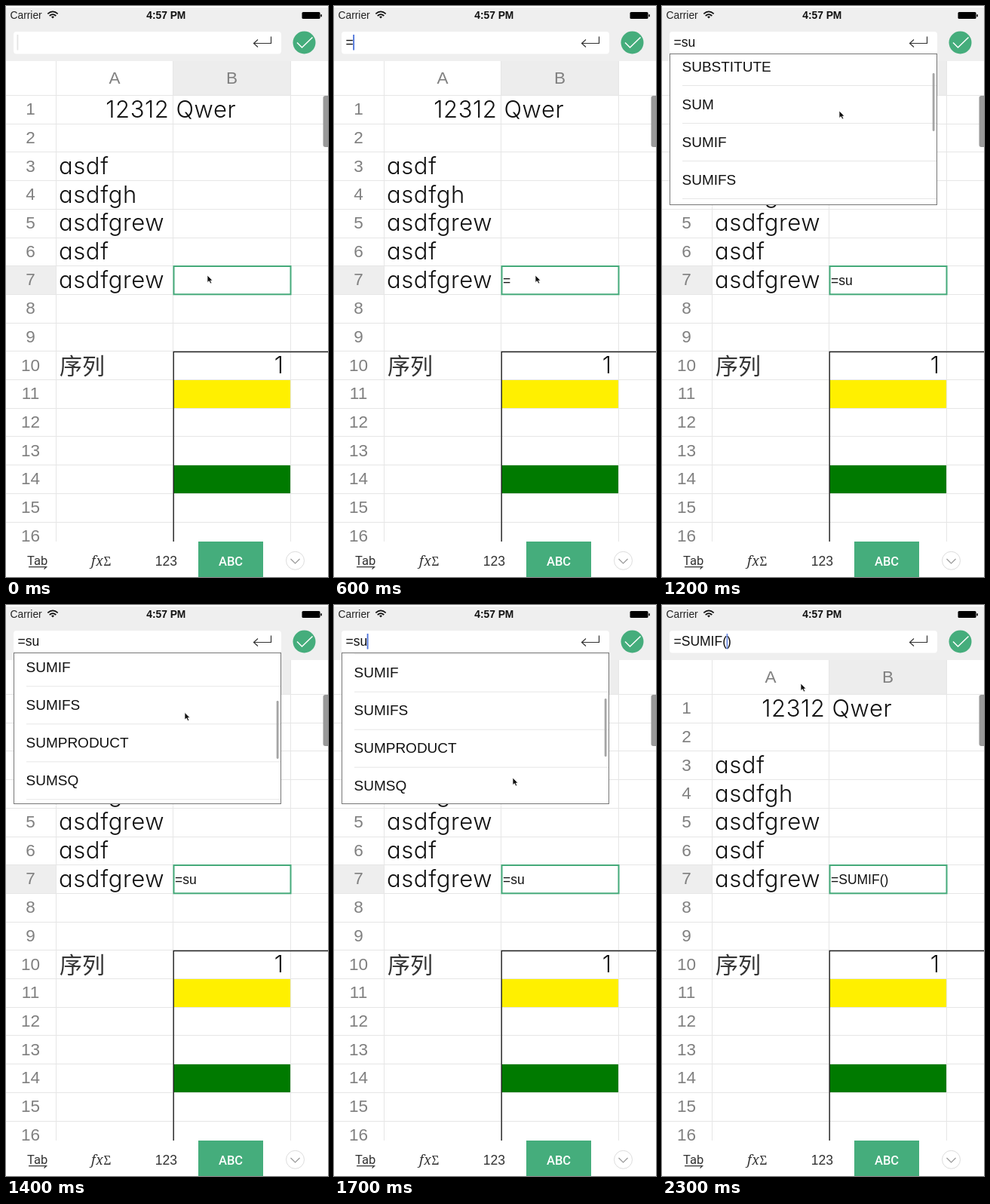
An HTML page that plays this animation: 427x757 px, repeating every 2400 ms.

```html
<!DOCTYPE html>
<html lang="en">
<head>
<meta charset="utf-8">
<title>Formula completion</title>
<style>
html, body { margin: 0; width: 100%; height: 100%; overflow: hidden; background: #fff; }
svg { display: block; width: 427px; height: 757px; }
text { font-family: "Liberation Sans", Arial, sans-serif; white-space: pre; }
.head { font-size: 22.5px; fill: #808080; text-anchor: middle; }
.cell { font: 300 31px Inter, sans-serif; font-feature-settings: "cv11"; letter-spacing: .6px; fill: #111; }
.cjk { font: 300 30px "Noto Sans CJK SC", "Noto Sans CJK", sans-serif; fill: #333; }
.end { text-anchor: end; }
.grid { stroke: #e6e6e6; }
.item { font-size: 19px; fill: #111; }
.edit { font-size: 17.5px; fill: #111; }
.line { fill: none; stroke: #333; stroke-width: 1.2; }
</style>
</head>
<body>
<svg viewBox="0 0 427 757">
  <defs><clipPath id="view"><rect x="11" y="64" width="353" height="199"/></clipPath></defs>

  <rect x="222" y="73" width="155.5" height="45" fill="#ededed"/>
  <rect y="344.5" width="66" height="38" fill="#eee"/>
  <g id="sheet"></g>
  <rect x="222" y="496" width="155" height="37" fill="#fff000"/>
  <rect x="222" y="609" width="155" height="37" fill="#007a00"/>
  <path d="M427 458.5H222.2V710" fill="none" stroke="#222" stroke-width="1.4"/>
  <rect x="222.5" y="345" width="155" height="37.3" fill="#fff" stroke="#45aa7a" stroke-width="2"/>
  <text id="cellText" class="edit" x="224" y="369.5"></text>
  <rect x="420.5" y="119" width="9" height="68" rx="3" fill="#999"/>

  <rect y="2" width="427" height="71" fill="#efefef"/>
  <text x="5.5" y="17.3" font-size="13.8" fill="#222">Carrier</text>
  <g fill="none" stroke="#111" stroke-width="1.7">
    <path d="M55.3 10.3Q62 4.6 68.7 10.3M57.7 13Q62 9.4 66.3 13"/>
    <path d="M60 14.3Q62 12.6 64 14.3L62 16.6Z" fill="#111" stroke="none"/>
  </g>
  <text x="212.3" y="17.3" font-size="13.8" font-weight="700" fill="#111" text-anchor="middle">4:57 PM</text>
  <rect x="392.5" y="8" width="24" height="9" rx="1.5" fill="#000"/>
  <rect x="417.2" y="11" width="1.6" height="3.6" rx=".8" fill="#000"/>

  <rect x="10" y="34" width="355" height="29.5" rx="4" fill="#fff"/>
  <text id="barText" class="edit" x="15.5" y="54.2"></text>
  <rect id="caret" y="38" width="1.8" height="20.5"/>
  <path class="line" d="M351.5 40.5V49.5H328.5M334 44.5L328.5 49.5L334 54.5"/>
  <circle cx="395.5" cy="48.5" r="15" fill="#45ad7c"/>
  <path d="M386 48.5L392.5 55L406.5 41.5" fill="none" stroke="#fff" stroke-width="1.5"/>

  <g id="popup">
    <rect x="10.5" y="63.5" width="354" height="200" fill="#fff" stroke="#777"/>
    <g clip-path="url(#view)">
      <g id="list"></g>
      <rect id="thumb" x="358.7" width="2.8" height="77" rx="1.4" fill="#a5a5a5"/>
    </g>
  </g>

  <rect y="710" width="427" height="47" fill="#fff"/>
  <text x="28" y="740.5" fill="#333" style="font:16.5px Roboto,sans-serif">Tab</text>
  <path class="line" d="M30 743.7H53.5L50.5 746.5"/>
  <text x="113" y="741.5" fill="#333" style="font:italic 17.5px 'Noto Serif',serif;letter-spacing:.7px">fx<tspan font-style="normal" font-size="16">Σ</tspan></text>
  <text x="212.3" y="742" font-size="17.5" fill="#333" text-anchor="middle">123</text>
  <rect x="255" y="710" width="86" height="47" fill="#45ad7c"/>
  <text x="298" y="741.5" fill="#fff" text-anchor="middle" style="font:500 16.5px Roboto,sans-serif">ABC</text>
  <circle cx="383.5" cy="735.3" r="12" fill="#fff" stroke="#ddd"/>
  <path d="M377.5 733L383.5 739L389.5 733" fill="none" stroke="#999" stroke-width="1.2"/>

  <path id="pointer" d="M0 0V9.5L2.3 7.6L4 11L5.7 10.2L4.2 7H7Z" fill="#111" stroke="#fff" stroke-width=".7"/>
</svg>
<script>
const LOOP = 2400, STEP = 100, ROW = 37.7, TOP = 118.5, ITEM = 50;
const $ = id => document.getElementById(id);
const label = (cls, x, y, s) => `<text class="${cls}" x="${x}" y="${y}">${s}</text>`;
const rule = (x1, y1, x2, y2) => `<path class="grid" d="M${x1} ${y1}L${x2} ${y2}"/>`;

function buildSheet() {
  let out = [66.5, 221.5, 377.5].map(x => rule(x, 73, x, 710)).join("");
  out += label("head", 144, 103, "A") + label("head", 299.5, 103, "B");
  for (let r = 1; r <= 16; r++) {
    const y = TOP + ROW * (r - 1);
    out += rule(0, Math.floor(y) + .5, 427, Math.floor(y) + .5);
    out += label("head", 32.5, y + 25.7, r);
  }
  const base = r => TOP + ROW * (r - 1) + 29;
  ["asdf", "asdfgh", "asdfgrew", "asdf", "asdfgrew"].forEach((s, i) => {
    out += label("cell", 70, base(i + 3), s);
  });
  out += label("cell end", 216.5, base(1), "12312") + label("cell", 225.5, base(1), "Qwer");
  out += label("cjk", 71, base(10) + 1, "序列") + label("cell end", 368.5, base(10), "1");
  $("sheet").innerHTML = out;
}

const matches = {
  "=f": "FACT FALSE FDIST FIND",
  "=s": "SEARCH SECOND SIGN SIN",
  "=su": "SUBTOTAL SUBSTITUTE SUM SUMIF SUMIFS SUMPRODUCT SUMSQ SUMX2MY2 SUMX2PY2 SUMXMY2"
};

// Each entry: start time, then values
const typing = [[0, ""], [200, "="], [300, "=f"], [600, "="], [700, "=s"], [800, "=su"], [2000, "=SUMIF()"]];
const caretInk = [[0, "#e4e4e4"], [100, "#4a70d8"], [1100, "none"], [1700, "#4a70d8"], [2200, "#6f8ce0"]];
const pointerPath = [[0, 267, 357], [900, 267, 357], [1100, 236, 197], [1200, 235, 139], [1300, 236, 105],
  [1500, 238, 180], [1700, 237, 229], [1900, 186, 100], [2300, 184, 104]];
const scrollPath = [[0, 0], [1100, 0], [1200, 58], [1500, 204.5], [1700, 148.3], [2300, 148.3]];

const held = (track, t) => track.filter(k => k[0] <= t).pop()[1];

function along(track, t) {
  const i = track.findIndex(k => k[0] > t);
  if (i < 0) return track[track.length - 1].slice(1);
  const a = track[i - 1], b = track[i], p = (t - a[0]) / (b[0] - a[0]);
  return a.slice(1).map((v, n) => v + (b[n + 1] - v) * p);
}

function fillList(text) {
  const names = matches[text];
  $("popup").style.display = names ? "" : "none";
  if (!names) return;
  $("list").innerHTML = names.split(" ").map((s, i) =>
    label("item", 26.5, 94.8 + i * ITEM, s) + rule(27, 113.5 + i * ITEM, 364, 113.5 + i * ITEM)).join("");
}

let shown = null;
function draw(t) {
  const text = held(typing, t);
  if (text !== shown) {
    shown = text;
    $("barText").textContent = $("cellText").textContent = text;
    fillList(text);
    const before = text.replace(")", "").length;
    const width = before ? $("barText").getSubStringLength(0, before) : -.5;
    $("caret").setAttribute("x", 15 + width);
  }
  $("caret").setAttribute("fill", held(caretInk, t));
  const [offset] = along(scrollPath, t);
  $("list").setAttribute("transform", `translate(0 ${-offset})`);
  $("thumb").setAttribute("y", 66.5 + offset * .388);
  $("thumb").style.display = t >= 1200 && t < 1900 ? "" : "none";
  $("pointer").setAttribute("transform", `translate(${along(pointerPath, t)})`);
}

buildSheet();
const start = performance.now();
let last = -1;
function tick() {
  const t = Math.floor((performance.now() - start) % LOOP / STEP) * STEP;
  if (t !== last) draw(last = t);
  requestAnimationFrame(tick);
}
tick();
</script>
</body>
</html>
```
